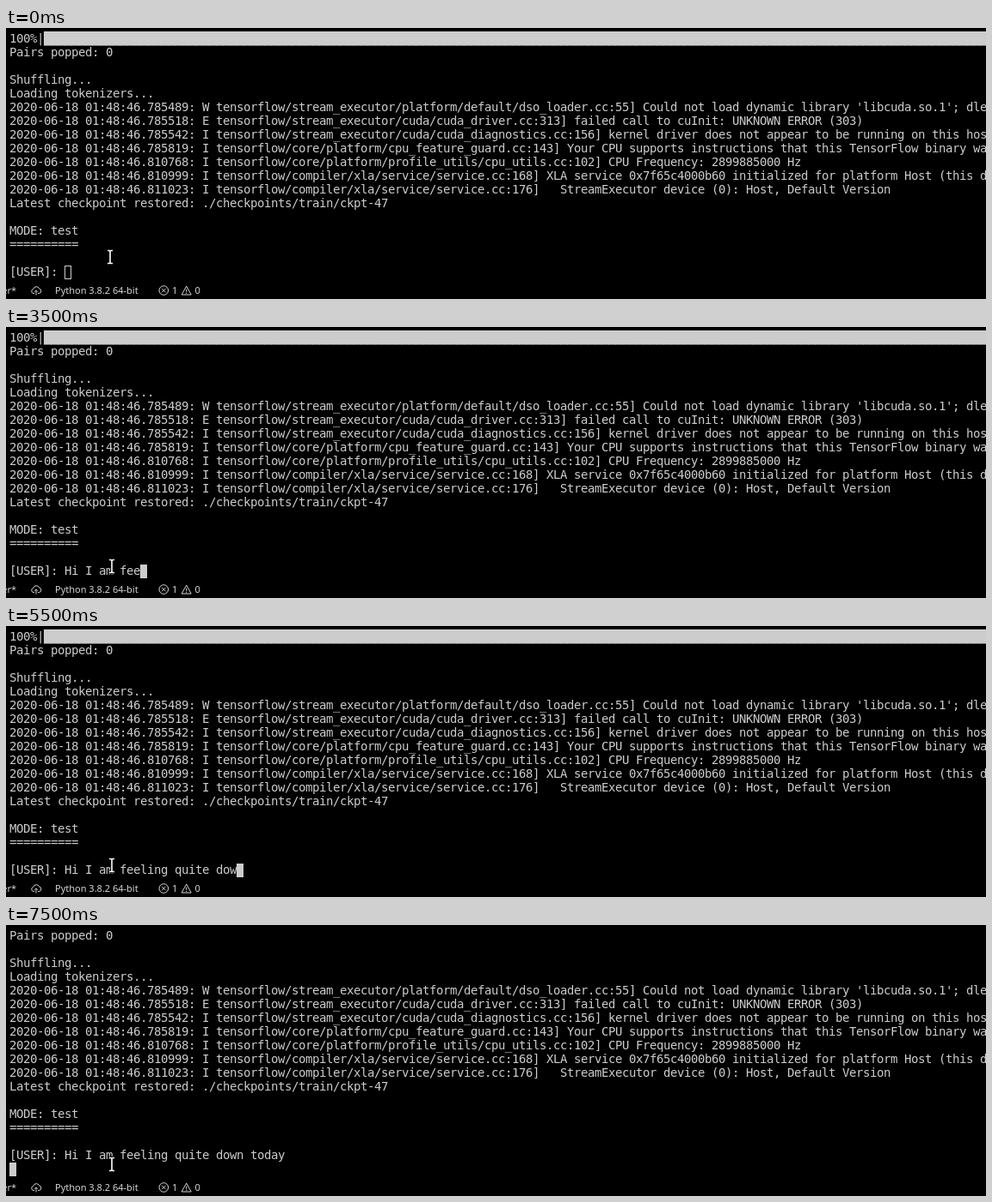
Recreate the animation shown at these times as an HTML page with a canvas. Size 1139x316 px, loop 8000 ms.

```html
<!DOCTYPE html>
<html lang="en">
<head>
<meta charset="utf-8">
<title>Chat terminal</title>
<style>
  html, body { margin: 0; width: 100%; height: 100%; overflow: hidden; background: #000; }
  canvas { display: block; }
</style>
</head>
<body>
<canvas id="stage" width="1139" height="316"></canvas>
<script>
const ctx = document.getElementById('stage').getContext('2d', { alpha: false });
const LOOP = 8000, ENTER = 7500, FOCUS = 600;
const LEFT = 4, TOP = 5, CELL_W = 8, CELL_H = 16, BASELINE = 12;
const FOREGROUND = '#cccccc', STATUS = '#d4d4d4';

const log = (micros, level, text) => `2020-06-18 01:48:46.${micros}: ${level} tensorflow/${text}`;
const output = [
  '100%|' + '█'.repeat(137),
  'Pairs popped: 0',
  '',
  'Shuffling...',
  'Loading tokenizers...',
  log(785489, 'W', "stream_executor/platform/default/dso_loader.cc:55] Could not load dynamic library 'libcuda.so.1'; dlerror"),
  log(785518, 'E', 'stream_executor/cuda/cuda_driver.cc:313] failed call to cuInit: UNKNOWN ERROR (303)'),
  log(785542, 'I', 'stream_executor/cuda/cuda_diagnostics.cc:156] kernel driver does not appear to be running on this host'),
  log(785819, 'I', 'core/platform/cpu_feature_guard.cc:143] Your CPU supports instructions that this TensorFlow binary was'),
  log(810768, 'I', 'core/platform/profile_utils/cpu_utils.cc:102] CPU Frequency: 2899885000 Hz'),
  log(810999, 'I', 'compiler/xla/service/service.cc:168] XLA service 0x7f65c4000b60 initialized for platform Host (this does'),
  log(811023, 'I', 'compiler/xla/service/service.cc:176]   StreamExecutor device (0): Host, Default Version'),
  'Latest checkpoint restored: ./checkpoints/train/ckpt-47',
  '',
  'MODE: test',
  '==========',
  ''
];
const prompt = '[USER]: ';
const message = 'Hi I am feeling quite down today';

// Time at which each character of the message appears.
const keyTimes = [
  1400, 1600, 1800, 2400, 2600, 2700, 3000, 3000, 3200, 3300, 3500, 3600, 3800, 4000, 4000, 4400,
  4400, 4500, 4700, 4900, 4900, 5100, 5300, 5400, 5500, 5700, 5900, 6200, 6400, 6600, 6800, 6800
];

function drawRow(text, row) {
  const y = TOP + row * CELL_H + BASELINE;
  [...text].forEach((char, col) => {
    if (char !== ' ') ctx.fillText(char, LEFT + col * CELL_W, y);
  });
}

function drawCursor(col, row, filled) {
  const x = LEFT + col * CELL_W, y = TOP + row * CELL_H;
  if (filled) {
    ctx.fillRect(x, y, CELL_W, CELL_H);
  } else {
    ctx.lineWidth = 1;
    ctx.strokeRect(x + 0.5, y + 0.5, CELL_W - 1, CELL_H - 1);
  }
}

function drawTerminal(t) {
  ctx.font = '14px "DejaVu Sans Mono", monospace';
  ctx.textAlign = 'left';
  ctx.fillStyle = ctx.strokeStyle = FOREGROUND;
  const entered = t >= ENTER;
  const input = prompt + message.slice(0, keyTimes.filter(k => k <= t).length);
  const rows = [...output, input];
  if (entered) {
    rows.shift();
    rows.push('');
  }
  rows.forEach(drawRow);
  drawCursor(entered ? 0 : input.length, rows.length - 1, t >= FOCUS);
}

function strokePath(d, width) {
  ctx.lineWidth = width;
  ctx.stroke(new Path2D(d));
}

function drawStatusBar() {
  ctx.font = '11px "Noto Sans", "Open Sans", sans-serif';
  ctx.fillStyle = ctx.strokeStyle = STATUS;
  ctx.textAlign = 'right';
  ctx.fillText('master*', 12, 310);
  ctx.textAlign = 'left';
  ctx.fillText('Python 3.8.2 64-bit', 57, 310);
  ctx.fillText('1', 193, 310);
  ctx.fillText('0', 219.5, 310);
  // Cloud with upload arrow
  strokePath('M33 309.5h-1a2.6 2.6 0 0 1-.3-5.1a3.7 3.7 0 0 1 7-.4a2.8 2.8 0 0 1-.4 5.5h-1.3', 1);
  strokePath('M35 311.5v-5.5M33 307.8l2-2l2 2', 1);
  // Error and warning
  strokePath('M188.6 306a5.3 5.3 0 1 1-10.6 0a5.3 5.3 0 1 1 10.6 0M181 303.7l4.6 4.6M185.6 303.7l-4.6 4.6', 1);
  strokePath('M209.7 301l5.5 10h-11zM209.7 304.5v3.3M209.7 308.7v1.2', 1);
}

function drawPointer(t) {
  const step = Math.min(3, Math.floor(t / 100)) / 3;
  ctx.save();
  ctx.translate(Math.round(121 + 2 * step), 267 + 12 * step);
  const beam = 'M-3 -7.5h2L0 -6.5L1 -7.5h2M0 -6.5v13M-3 7.5h2L0 6.5L1 7.5h2';
  ctx.strokeStyle = '#000';
  strokePath(beam, 3.4);
  ctx.strokeStyle = '#fff';
  strokePath(beam, 1.6);
  ctx.restore();
}

function render(now) {
  const t = now % LOOP;
  ctx.fillStyle = '#000';
  ctx.fillRect(0, 0, 1139, 316);
  drawTerminal(t);
  drawStatusBar();
  drawPointer(t);
}

const start = performance.now();
function tick() {
  render(performance.now() - start);
  requestAnimationFrame(tick);
}
tick();
</script>
</body>
</html>
```
